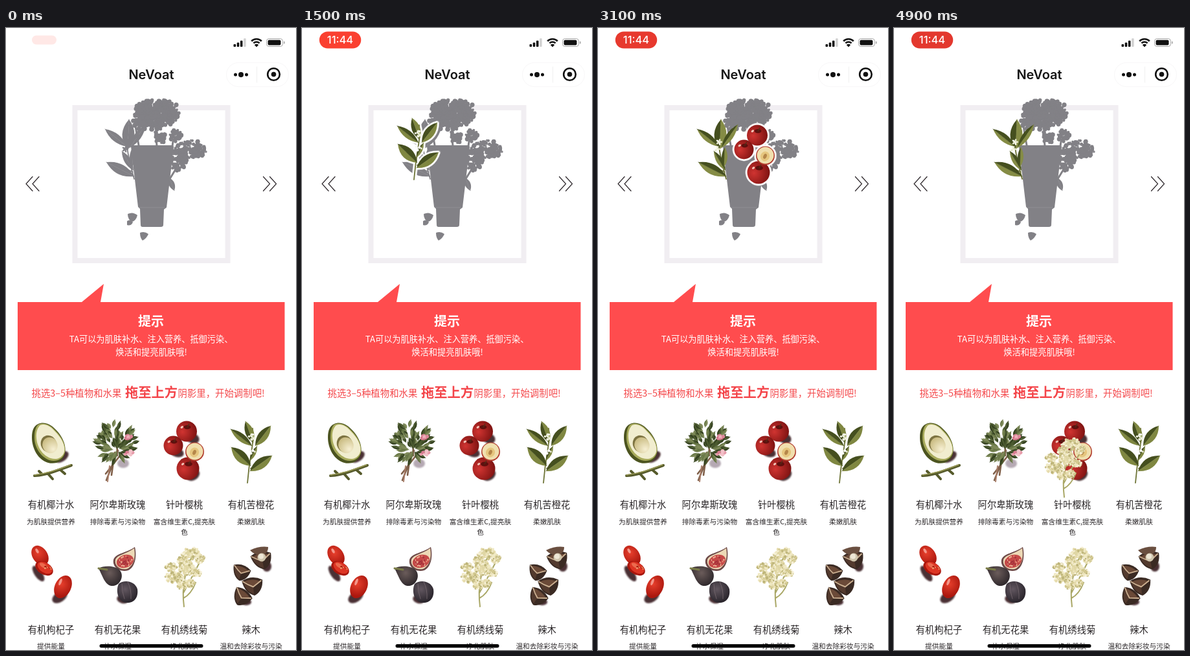
These frames come from a looping animation (448x960 px, 5000 ms). An HTML page with a canvas:

```html
<!DOCTYPE html>
<html lang="zh-CN">
<head>
<meta charset="utf-8">
<title>植物调制</title>
<style>
  html, body { margin: 0; width: 100%; height: 100%; overflow: hidden; background: #fff; }
  canvas { display: block; width: 448px; height: 960px; }
</style>
</head>
<body>
<canvas id="stage" width="448" height="960"></canvas>
<script>
const W = 448, H = 960, LOOP = 5000, TAU = Math.PI * 2;
const CJK = '"Noto Sans CJK SC", "Noto Sans CJK", sans-serif';
const LATIN = 'Inter, sans-serif';
const GREY = '#828186', RED = '#ff4c4e';
const view = document.getElementById('stage').getContext('2d');

// ---- drawing helpers ----
function layer(draw) {
  const c = document.createElement('canvas');
  c.width = W;
  c.height = H;
  draw(c.getContext('2d'));
  return c;
}

const tint = (img, color) => layer(g => {
  g.drawImage(img, 0, 0);
  g.globalCompositeOperation = 'source-in';
  g.fillStyle = color;
  g.fillRect(0, 0, W, H);
});

function randomizer(seed) {
  return () => (seed = (seed * 16807) % 2147483647) / 2147483647;
}

function oval(g, x, y, rx, ry, turn, color) {
  g.fillStyle = color;
  g.beginPath();
  g.ellipse(x, y, rx, ry, turn, 0, TAU);
  g.fill();
}

const dot = (g, x, y, r, color) => oval(g, x, y, r, r, 0, color);

function shape(g, d, color) {
  g.fillStyle = color;
  g.fill(new Path2D(d));
}

function line(g, d, color, width) {
  g.strokeStyle = color;
  g.lineWidth = width;
  g.lineCap = 'round';
  g.stroke(new Path2D(d));
}

function pill(g, x, y, w, h, r, color) {
  g.fillStyle = color;
  g.beginPath();
  g.roundRect(x, y, w, h, r);
  g.fill();
}

// Radial shading with the light coming from (x, y).
function glow(g, x, y, r, inner, outer) {
  const fill = g.createRadialGradient(x, y, 0, x, y, r);
  fill.addColorStop(0, inner);
  fill.addColorStop(1, outer);
  return fill;
}

// A pointed leaf whose two halves differ in tone.
function leaf(g, x1, y1, x2, y2, width, light, dark = light) {
  const len = Math.hypot(x2 - x1, y2 - y1);
  const mx = (x1 + x2) / 2, my = (y1 + y2) / 2;
  const nx = (y1 - y2) / len * width, ny = (x2 - x1) / len * width;
  const half = (s, color) => shape(g,
    `M${x1} ${y1}Q${mx + nx * s} ${my + ny * s} ${x2} ${y2}Q${mx} ${my} ${x1} ${y1}Z`, color);
  half(1, light);
  half(-1, dark);
  line(g, `M${x1} ${y1}L${x2} ${y2}`, light, 0.7);
}

// Seeded dots scattered over an ellipse.
function scatter(g, seed, x, y, rx, ry, count, min, max, colors) {
  const rnd = randomizer(seed);
  for (let i = 0; i < count; i++) {
    const a = rnd() * TAU, d = Math.sqrt(rnd());
    dot(g, x + Math.cos(a) * d * rx, y + Math.sin(a) * d * ry,
      min + rnd() * (max - min), colors[Math.floor(rnd() * colors.length)]);
  }
}

function text(g, s, x, y, size, color, weight = 400, align = 'center') {
  g.font = `${weight} ${size}px ${CJK}`;
  g.textAlign = align;
  g.fillStyle = color;
  g.fillText(s, x, y + size * 0.38);
}

// ---- plants ----
function avocado(g) {
  line(g, 'M44 691Q58 690 70 686T101 675M64 687L72 696M84 682L91 688M56 689L51 684', '#565a2b', 4);
  line(g, 'M44 690Q58 688 70 684.5T100 674', '#9a9a55', 1.6);
  shape(g, 'M50 611C58 607 69 611 77 620C86 629 94 643 91 657C88 669 77 674 65 671C50 667 40 649 40 632C40 621 43 614 50 611Z', '#4c5420');
  shape(g, 'M50 612C58 608 68 612 76 621C86 631 93 643 91 655C88 666 77 670 67 667C54 662 44 648 44 632C44 622 46 615 50 612Z', '#a8ab5c');
  shape(g, 'M53 613C60 610 68 614 75 622C85 632 92 643 90 654C87 664 78 667 69 664C57 660 48 647 47 633C46 624 49 616 53 613Z', '#f1edcf');
  oval(g, 66, 642, 12, 13.5, -0.5, '#7d7340');
  oval(g, 68, 644, 11.5, 12.5, -0.5, glow(g, 73, 650, 19, '#f6efd2', '#cbbd84'));
}

function rose(g) {
  line(g, 'M173 652L155 698M168 655L163 690M180 655L154 688M171 625L172 660', '#80604a', 2.6);
  line(g, 'M160 676L157 700', '#a97e69', 2);
  const rnd = randomizer(57), tones = ['#4b5a30', '#687746', '#34411f', '#7f8a59'];
  for (let i = 0; i < 95; i++) {
    const a = rnd() * TAU, d = Math.sqrt(rnd()) * 0.78;
    const x = 171 + Math.cos(a) * d * 31, y = 640 + Math.sin(a) * d * 32;
    const turn = Math.atan2(y - 652, x - 171) + rnd() - 0.5, len = 9 + rnd() * 7;
    leaf(g, x, y, x + Math.cos(turn) * len, y + Math.sin(turn) * len, 5.5,
      tones[i % 4], tones[(i + 2) % 4]);
  }
  scatter(g, 8, 188, 631, 6, 4, 12, 1.5, 3, ['#dc8698', '#c9647c', '#efb0ba']);
  scatter(g, 12, 189, 656, 8, 4, 15, 1.5, 3, ['#e79cab', '#d97c92', '#f2c2c9']);
}

function apple(g, x, y, r) {
  dot(g, x, y, r, glow(g, x - r * 0.4, y + r * 0.05, r * 1.5, '#d03431', '#78100f'));
  oval(g, x + 1, y - r * 0.4, r * 0.34, r * 0.2, 0, '#5e100e');
  oval(g, x - r * 0.45, y - r * 0.4, 2.4, 1.6, -0.6, '#f2c4b8');
  line(g, `M${x + 1} ${y - r * 0.4}l3 -5`, '#4c331a', 1.3);
}

function apples(g) {
  apple(g, 279, 622.5, 16);
  apple(g, 258.5, 644.5, 15);
  apple(g, 281, 680, 17.5);
  dot(g, 291.5, 654, 14.5, '#b03a2c');
  dot(g, 291.5, 653.5, 13, '#f0dfae');
  oval(g, 291, 655, 7, 7.5, 0.4, '#e6c67f');
  oval(g, 291, 655, 2.6, 4, 0.4, '#b5874a');
}

function branch(g) {
  line(g, 'M373 702Q375 678 379 655T381 618M378 680L394 668M377 672L362 660', '#6f7538', 1.8);
  const a = '#7f8741', b = '#454f1f';
  leaf(g, 382, 640, 370, 607, 13, a, b);
  leaf(g, 380, 645, 347, 619, 12, b, a);
  leaf(g, 385, 645, 409, 614, 15, a, b);
  leaf(g, 378, 676, 348, 647, 17, b, a);
  leaf(g, 377, 684, 411, 660, 16, a, b);
  leaf(g, 377, 668, 388, 645, 7, a, b);
  scatter(g, 31, 379, 631, 4, 7, 8, 1.2, 2.3, ['#eef0dc', '#ffffff', '#cbd4a4']);
  scatter(g, 44, 380, 654, 5, 7, 6, 1.2, 2.2, ['#eef0dc', '#ffffff']);
}

function goji(g) {
  const skin = (x, y) => glow(g, x, y, 19, '#e8402d', '#ab170e');
  oval(g, 52.5, 814, 11.5, 16.5, -0.6, skin(50, 810));
  oval(g, 48, 807, 2, 4, -0.5, '#f4978a');
  oval(g, 59, 834, 15, 9.5, 0.55, '#a8160d');
  oval(g, 60, 833, 12.5, 7.5, 0.55, '#dd3524');
  oval(g, 58, 830, 7, 3, 0.55, '#ec6a4e');
  scatter(g, 7, 61, 835, 9, 5, 9, 0.8, 1.5, ['#f0a070', '#a51c10']);
  oval(g, 88, 862.5, 12.5, 18.5, 0.45, skin(85, 858));
  oval(g, 84, 855, 2, 5.5, 0.4, '#f4978a');
}

function figs(g) {
  shape(g, 'M199 801C202 812 201 831 189 837C176 841 164 832 166 821C169 810 186 811 199 801Z', '#6e4a48');
  shape(g, 'M198 803C200 814 199 828 188 834.5C177 838 167 830 169 821C171 813 186 812 198 803Z', '#ecd9b6');
  oval(g, 184, 823, 13.5, 9.8, -0.35, '#c64a48');
  scatter(g, 81, 184, 823, 11, 8, 34, 0.7, 1.4, ['#e58a74', '#a1303a', '#efb598']);
  shape(g, 'M143 834C151 830 166 829 175 836C183 844 178 859 166 861C153 862 150 847 143 834Z',
    glow(g, 160, 841, 22, '#6b5c5a', '#2b2529'));
  line(g, 'M143 834L156 836', '#7a7c48', 3);
  shape(g, 'M174 858C182 851 199 853 203 866C205 880 197 888 186 887C173 886 169 869 174 858Z',
    glow(g, 184, 866, 21, '#625760', '#2a252c'));
  line(g, 'M179 858Q179 870 183 881M188 855Q194 866 193 881', '#786a70', 0.8);
}

function spirea(g) {
  line(g, 'M275 893Q272 870 276 850T289 812M274 872Q285 852 300 823M275 864Q264 846 254 836M274 880Q286 874 293 856', '#a9a766', 2);
  const tones = ['#f0e9c4', '#e6dcae', '#d2c88f', '#f7f1d8', '#beb57a'];
  const puffs = [[285, 811, 15, 9], [299, 819, 8, 7], [255, 832, 9, 6], [262, 847, 16, 10],
    [280, 833, 14, 12], [294, 841, 8, 5], [272, 860, 9, 6], [284, 857, 7, 6], [273, 822, 8, 7]];
  puffs.forEach(([x, y, rx, ry], i) => {
    oval(g, x, y, rx * 0.75, ry * 0.75, 0, '#dfd6a4');
    scatter(g, 300 + i * 71, x, y, rx, ry, 80, 0.8, 2.3, tones);
  });
}

function seed(g, x, y, r, turn) {
  g.save();
  g.translate(x, y);
  g.rotate(turn);
  g.scale(r, r);
  shape(g, 'M-1 -.55Q0 -1.1 1 -.5Q.95 .6 .1 .95Q-.8 .65 -1 -.55Z', '#3a2a23');
  shape(g, 'M-.8 -.5Q0 -.75 .75 -.4L.05 .1Z', '#6b4a38');
  shape(g, 'M-.85 -.35L.05 .1L.05 .8Q-.65 .5 -.85 -.35Z', '#533a2e');
  line(g, 'M-.9 -.5Q-.4 -.1 .05 .1L.85 -.42', '#cdb192', 0.12);
  g.restore();
}

function moringa(g) {
  seed(g, 395, 821, 16, -0.2);
  seed(g, 363, 840, 14, 0.3);
  seed(g, 381, 861, 16, -0.1);
  seed(g, 364, 878, 15, 0.6);
  shape(g, 'M377 806Q392 799 405 801Q405 812 394 813Q384 814 377 806Z', '#6a4f40');
  dot(g, 395, 817, 6.5, '#cfc5ad');
  dot(g, 394, 815.5, 4, '#eee7d6');
}

// The blossom sprig as it sits in the shadow picture.
function sprig(g) {
  line(g, 'M198 233Q190 205 187 184T189 150M196 222L173 213M187 184L205 165', '#6b7033', 1.8);
  const a = '#858c45', b = '#454f1f';
  leaf(g, 187, 183, 153, 156, 12, b, a);
  leaf(g, 188, 188, 190, 141, 19, a, b);
  leaf(g, 191, 185, 216, 149, 11, a, b);
  leaf(g, 198, 229, 155, 207, 16, b, a);
  leaf(g, 197, 220, 179, 190, 10, b, a);
  leaf(g, 195, 214, 196, 184, 9, a, b);
  for (const [x, y] of [[187, 176], [184, 187]])
    for (let i = 0; i < 5; i++)
      oval(g, x + Math.cos(i * TAU / 5) * 2.6, y + Math.sin(i * TAU / 5) * 2.6,
        2.6, 1.4, i * TAU / 5, i % 2 ? '#fffef4' : '#e9ead0');
}

// ---- static screen ----
function bouquet(g) {
  const c = [GREY];
  scatter(g, 91, 230, 131, 33, 20, 280, 1.5, 4, c);
  scatter(g, 65, 247, 130, 20, 20, 110, 1.5, 4, c);
  scatter(g, 23, 218, 148, 24, 11, 60, 2, 4, c);
  scatter(g, 17, 238, 165, 8, 15, 40, 1.5, 3.5, c);
  scatter(g, 37, 262, 166, 9, 10, 40, 1.5, 3.5, c);
  scatter(g, 49, 284, 187, 23, 14, 130, 1.2, 3.5, c);
  scatter(g, 72, 266, 203, 13, 18, 85, 1.5, 3.5, c);
  scatter(g, 15, 298, 191, 11, 9, 40, 1.2, 3, c);
  line(g, 'M199 146L205 181M231 160L233 182M258 175L249 240M264 215L251 236', GREY, 3);
  leaf(g, 252, 231, 260, 251, 9, GREY);
  shape(g, 'M193 183Q194 181 197 181H256Q259 181 259 184L248 277L244 280L243 304Q243 307 239 307H211Q208 307 208 304L207 279L204 276Z', GREY);
  shape(g, 'M188 287Q196 283 203 289Q201 297 195 299Q188 296 188 287Z', GREY);
  shape(g, 'M187 298Q192 294 196 300Q193 306 187 304Z', GREY);
  shape(g, 'M207 316Q214 313 220 318Q217 325 211 328Q207 324 207 316Z', GREY);
  line(g, 'M206 277H245', '#939297', 0.8);
}

function statusBar(g) {
  [4, 6.5, 9.5, 13].forEach((h, i) =>
    pill(g, 351.5 + i * 5.2, 29 - h, 3.6, h, 1, i < 3 ? '#111' : '#d2d2d2'));
  g.save();
  g.lineCap = 'butt';
  g.strokeStyle = '#111';
  g.lineWidth = 2.7;
  for (const r of [6.5, 11]) {
    g.beginPath();
    g.arc(387, 28, r, -Math.PI * 0.75, -Math.PI * 0.25);
    g.stroke();
  }
  g.restore();
  shape(g, 'M387 29.5L383.8 26Q387 23.5 390.2 26Z', '#111');
  g.strokeStyle = '#a8a8a8';
  g.lineWidth = 1;
  g.beginPath();
  g.roundRect(402.5, 16.5, 25, 12, 3.8);
  g.stroke();
  pill(g, 404.5, 18.5, 20, 8, 2, '#111');
  pill(g, 429, 20.5, 1.6, 4, 0.8, '#a8a8a8');
}

function header(g) {
  g.font = `600 20px ${LATIN}`;
  g.textAlign = 'center';
  g.fillStyle = '#151515';
  g.fillText('NeVoat', 224.5, 79);
  g.strokeStyle = '#f8f7f8';
  g.lineWidth = 1;
  g.beginPath();
  g.roundRect(340.5, 53.5, 96, 37, 18.5);
  g.stroke();
  line(g, 'M387.5 60V84', '#f0eff0', 1);
  dot(g, 354.5, 72, 2.5, '#111');
  dot(g, 363, 72, 4, '#111');
  dot(g, 371.5, 72, 2.5, '#111');
  g.strokeStyle = '#111';
  g.lineWidth = 2.6;
  g.beginPath();
  g.arc(413.5, 71.5, 9.3, 0, TAU);
  g.stroke();
  dot(g, 413.5, 71.5, 3.8, '#111');
}

function hint(g) {
  shape(g, 'M18 423H117L151 395L146 423H430.5V528H18Z', RED);
  text(g, '提示', 224, 452, 20, '#fff', 700);
  text(g, 'TA可以为肌肤补水、注入营养、抵御污染、', 224, 479.5, 13.2, '#fff');
  text(g, '焕活和提亮肌肤哦!', 224.5, 500, 13.3, '#fff');
  text(g, '挑选3–5种植物和水果', 39.5, 564, 14.4, '#f4484b', 400, 'left');
  text(g, '拖至上方', 184, 562, 20.3, '#f4454a', 700, 'left');
  text(g, '阴影里，开始调制吧!', 265.5, 564, 14.4, '#f4484b', 400, 'left');
}

const plants = [
  [avocado, '有机椰汁水', '为肌肤提供营养'],
  [rose, '阿尔卑斯玫瑰', '排除毒素与污染物'],
  [apples, '针叶樱桃', '富含维生素C,提亮肤', '色'],
  [branch, '有机苦橙花', '柔嫩肌肤'],
  [goji, '有机枸杞子', '提供能量'],
  [figs, '有机无花果', '补水保湿'],
  [spirea, '有机绣线菊', '净化肌肤'],
  [moringa, '辣木', '温和去除彩妆与污染']
];

function shadows(g) {
  g.filter = 'blur(1px)';
  const dark = [[86, 662, 12, 7, -0.6], [288, 633, 11, 8, 0.4], [264, 655, 11, 7, 0.3],
    [289, 690, 11, 8, -0.6], [50, 842, 6, 14, -0.6], [83, 878, 13, 8, -0.6],
    [180, 882, 9, 6, 0.3], [403, 831, 7, 8, 0], [371, 886, 8, 5, 0]];
  for (const s of dark) oval(g, ...s, '#4a3034');
  oval(g, 181, 672, 9, 7, 0, '#b5a9b3');
  g.filter = 'none';
}

const sprigImg = layer(sprig);
const sprigShade = tint(sprigImg, GREY);

const screen = layer(g => {
  g.fillStyle = '#fff';
  g.fillRect(0, 0, W, H);
  statusBar(g);
  header(g);
  g.strokeStyle = '#f1eef2';
  g.lineWidth = 8;
  g.strokeRect(106.5, 123, 236, 236);
  bouquet(g);
  for (const x of [41, 51]) line(g, `M${x} 229.5L${x - 10} 240.5L${x} 251.5`, '#2b2529', 1.2);
  for (const x of [397.5, 407.5]) line(g, `M${x} 229.5L${x + 10} 240.5L${x} 251.5`, '#2b2529', 1.2);
  hint(g);
  shadows(g);
  plants.forEach(([draw, name, note, more], i) => {
    const x = 69.5 + (i % 4) * 103, y = i < 4 ? 736 : 928.5;
    draw(g);
    text(g, name, x, y, 14.3, '#2a2628');
    text(g, note, x, y + 25.5, 10.7, '#2a2628');
    if (more) text(g, more, x, y + 42, 10.7, '#2a2628');
  });
});

// ---- motion ----
// Cut-out with a white rim, as shown while dragging.
const sticker = draw => {
  const img = layer(draw), rim = tint(img, '#fff');
  return layer(g => {
    for (let i = 0; i < 16; i++)
      g.drawImage(rim, Math.cos(i * TAU / 16) * 2.4, Math.sin(i * TAU / 16) * 2.4);
    g.drawImage(img, 0, 0);
  });
};

const SNAP = 1900;
const drags = [
  { img: sticker(branch), from: 700, to: 1400, drop: SNAP, dx: -200, dy: -468 },
  { img: sticker(apples), from: 2500, to: 3100, drop: 3600, dx: -33, dy: -457 },
  { img: layer(spirea), from: 4500, to: 5300, drop: LOOP, dx: -24, dy: -338 }
];

const clamp = v => Math.max(0, Math.min(1, v));
const smooth = v => v * v * (3 - 2 * v);

function clock(g, t) {
  const grow = smooth(clamp(t / 300)), dim = 0.5 + 0.5 * Math.cos((t - 740) / 2100 * TAU);
  const w = 38 + 26.5 * grow, h = 14 + 12 * grow;
  g.save();
  g.globalAlpha = 0.12 + 0.88 * grow;
  pill(g, 59 - w / 2, 18.5 - h / 2, w, h, h / 2,
    `rgb(${255 - 28 * dim}, ${66 - 10 * dim}, ${49 - 3 * dim})`);
  g.globalAlpha = grow;
  g.font = `500 16.5px ${LATIN}`;
  g.textAlign = 'center';
  g.fillStyle = '#fff';
  g.fillText('11:44', 59, 24.3);
  g.restore();
}

function render(t) {
  const g = view;
  g.drawImage(screen, 0, 0);
  g.drawImage(t < SNAP ? sprigShade : sprigImg, 0, 0);
  clock(g, t);
  for (const d of drags) {
    if (t < d.from || t >= d.drop) continue;
    const k = smooth(clamp((t - d.from) / (d.to - d.from)));
    g.drawImage(d.img, d.dx * k, d.dy * k);
  }
  pill(g, 144.5, 951, 160, 5.5, 2.75, '#080808');
}

const start = performance.now();
function tick() {
  const t = (performance.now() - start) % LOOP;
  render(Math.floor(t / 100) * 100);
  requestAnimationFrame(tick);
}
tick();
</script>
</body>
</html>
```
